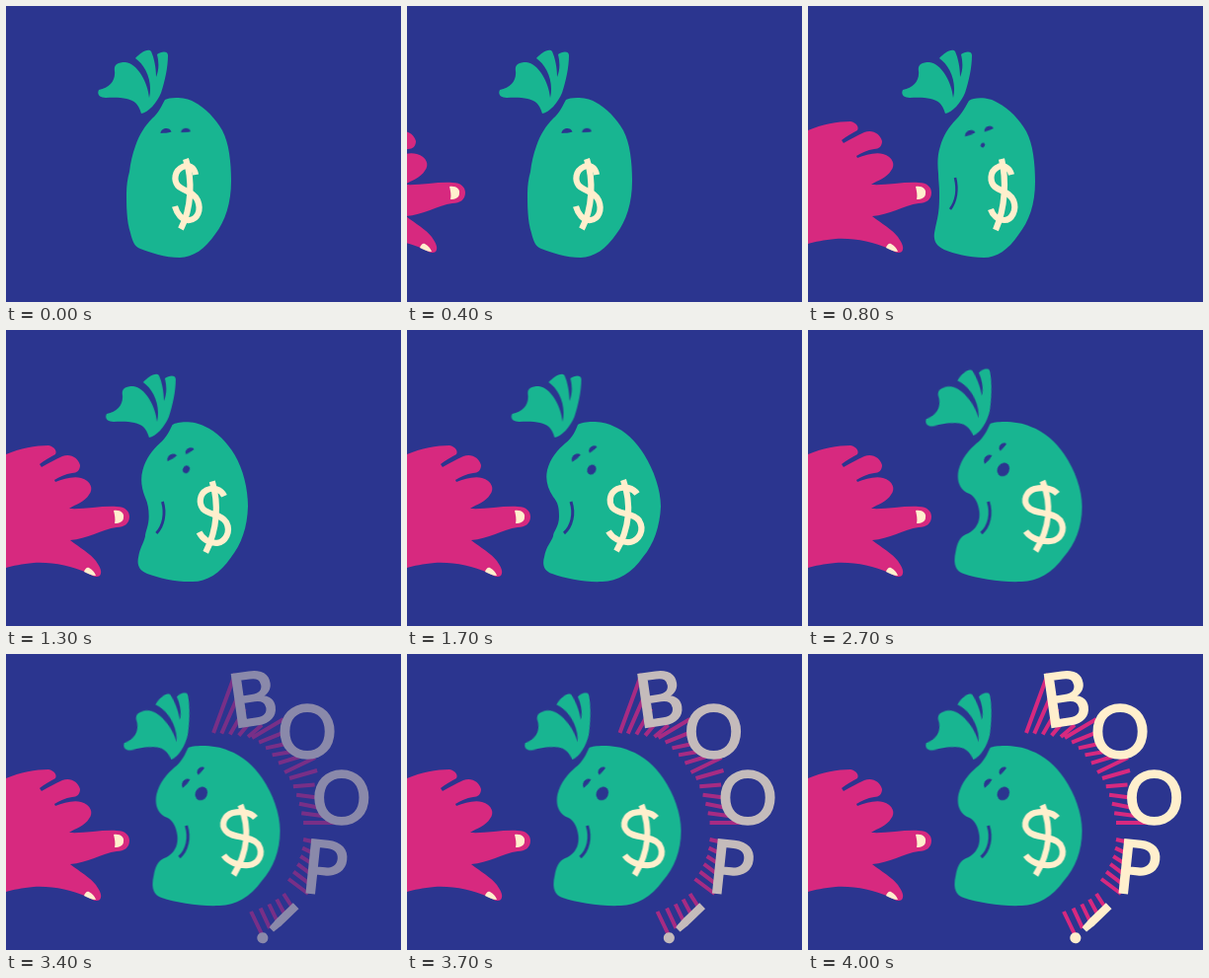
Write an HTML page that moves like this. It is 400 by 300 pixels and loops after 7000 ms.

```html
<!DOCTYPE html>
<html lang="en">
<head>
<meta charset="utf-8">
<title>Boop</title>
<style>
  html, body { margin: 0; width: 100%; height: 100%; overflow: hidden; background: #2b358f; }
  svg { display: block; width: 100%; height: 100%; }

  .bag { fill: #18b591; }
  .ink { fill: #2b358f; }
  .line { fill: none; stroke-linecap: butt; }
  .coin { stroke: #ffefcd; stroke-width: 6.2; }
  .dent { stroke: #2b358f; }
  .skin { fill: #d7297f; }
  .nail { fill: #ffefcd; }
  .rays { stroke: #d7297f; stroke-width: 4; }
  .letters {
    fill: #ffefcd; stroke: #ffefcd; stroke-width: 2.4;
    font: 74.5px Lato, sans-serif; text-anchor: middle;
  }
  .letters .mark { font-size: 69px; }

  /* Motion advances ten times a second; each segment sets its own step count. */
  .move { animation: 7s steps(4) infinite; }
  #shift { animation-name: shift; }
  #hand { animation-name: hand; }
  #tie { animation-name: tie; transform-origin: 137px 109px; }
  #body { animation-name: body; }
  #curve { animation-name: curve; }
  #bar { animation-name: bar; }
  #eyeL { animation-name: eyeL; }
  #eyeR { animation-name: eyeR; }
  #mouth { animation-name: mouth; }
  #dent { animation-name: dent; }
  #boop { animation-name: boop; }

  @keyframes hand {
    0% { transform: translateX(-132px); animation-timing-function: steps(8); }
    11.42%, 100% { transform: none; }
  }
  @keyframes shift {
    0%, 29.99% { transform: translateX(0); animation-timing-function: steps(6); }
    38.56%, 100% { transform: translateX(10.5px); }
  }
  @keyframes boop {
    0%, 41.42% { transform: translateX(-20px); opacity: 0; animation-timing-function: steps(11); }
    57.13%, 100% { transform: translateX(0); opacity: 1; }
  }
  @keyframes tie {
    0%, 5.71% { transform: translate(0, 0) rotate(0deg) scale(1); }
    11.42% { transform: translate(2px, 0) rotate(0deg) scale(1); animation-timing-function: steps(9); }
    24.28% { transform: translate(12.5px, 0) rotate(0deg) scale(1); }
    29.99%, 100% { transform: translate(20px, -2px) rotate(-10deg) scale(1.03); }
  }
  @keyframes body {
    0%, 5.71% { d: path("M161,95 C166,92 182,92 190,97 C202,103 212,114 219,126 C226,139 228,159 228,177 C228,200 222,218 212,231 C202,246 189,255 176,255 C161,255 146,250 136,246 C130,244 128,238 126,230 C124,224 123,217 122.5,210 C122,203 122,196 122,190 C122,182 123,175 125,168 C126,159 128,150 131,142 C135,130 141,121 148,114 C155,108 158,100 161,95Z"); }
    11.42% { d: path("M163,96 C168,92 184,92 192,98 C204,104 214,115 221,127 C228,140 230,160 230,178 C230,201 224,218 213,232 C203,247 191,255 178,255 C163,255 148,251 138,247 C129,243 127,237 128,230 C129,223 131,217 132,210 C133,203 133,196 133,189 C133,183 132,176 132,170 C131,160 131,151 134,142 C137,131 143,122 150,115 C156,109 160,101 163,96Z"); animation-timing-function: steps(9); }
    24.28% { d: path("M173,96 C179,92 198,92 208,97 C221,102 232,113 240,126 C250,142 257,162 257,179 C256,199 250,217 239,230 C228,246 213,255 198,255 C181,256 161,252 147,247 C138,244 137,237 139,230 C141,219 146,215 148,209 C148,204 154,200 154,189 C154,180 153,175 148,169 C142,160 140,151 142,142 C145,130 153,121 160,115 C168,109 171,101 173,96Z"); }
    29.99%, 100% { d: path("M174,95 C180,92 203,92 215,98 C229,103 240,113 249,126 C260,142 267,162 267,179 C267,200 260,217 248.5,230 C237,246 222,255 206,255 C186,256 162,252 147,247 C137,244 137,233 139,225 C141,213 145,208 152,206 C161,201 164,193 163,184 C162,176 159,169 153,166 C142,162 140,151 142,142 C145,130 153,121 160,115 C168,109 171,101 174,95Z"); }
  }
  @keyframes curve {
    0%, 5.71% { d: path("M192,171 C191,163 184,160 179,163 C170,167 170,177 174,182 C180,188 190,188 194,197 C198,207 194,216 186,217 C178,218 173,210 171,203"); }
    11.42% { d: path("M206,171 C204,163 197,160 191,164 C184,168 184,178 189,183 C195,188 204,188 208,197 C212,207 206,217 199,217 C192,217 187,212 185,206"); animation-timing-function: steps(9); }
    24.28% { d: path("M233,166 C229,160 220,158 213,161 C205,165 204,174 208,180 C215,188 228,184 235,193 C241,203 235,213 226,215 C217,216 208,211 204,204"); }
    29.99%, 100% { d: path("M242,166 C237,160 227,159 219,161 C210,164 207,173 212,179 C219,188 237,183 245,193 C251,203 245,213 235,214 C225,215 215,211 210,204"); }
  }
  @keyframes bar {
    0%, 5.71% { d: path("M182,155 C189,176 188,205 177,226"); }
    11.42% { d: path("M196,155 C201,176 200,204 190,227"); animation-timing-function: steps(9); }
    24.28% { d: path("M219,152 C227,175 226,200 212,224"); }
    29.99%, 100% { d: path("M227,153 C236,175 235,200 220,224"); }
  }
  @keyframes eyeL {
    0%, 5.71% { transform: translate(162px, 127px) rotate(0deg); }
    11.42% { transform: translate(164px, 129px) rotate(-15deg); animation-timing-function: steps(9); }
    24.28% { transform: translate(171px, 129px) rotate(-33deg); }
    29.99%, 100% { transform: translate(171.5px, 130.5px) rotate(-42deg); }
  }
  @keyframes eyeR {
    0%, 5.71% { transform: translate(182px, 126.5px) rotate(0deg) scale(.9); }
    11.42% { transform: translate(183px, 124.5px) rotate(-15deg) scale(.9); animation-timing-function: steps(9); }
    24.28% { transform: translate(188px, 120.5px) rotate(-33deg) scale(.9); }
    29.99%, 100% { transform: translate(186.5px, 118px) rotate(-42deg) scale(.9); }
  }
  @keyframes mouth {
    0%, 5.71% { transform: translate(173px, 141px) rotate(30deg) scale(0); }
    11.42% { transform: translate(177px, 141px) rotate(30deg) scale(.35); animation-timing-function: steps(9); }
    24.28% { transform: translate(187px, 141.5px) rotate(30deg) scale(.72); }
    29.99%, 100% { transform: translate(187.3px, 141.5px) rotate(30deg) scale(1); }
  }
  @keyframes dent {
    0%, 5.71% { d: path("M142,174 C144,186 143,198 138,206"); stroke-width: 0; }
    11.42% { d: path("M149,174 C152,186 150,198 144,206"); stroke-width: 2.6; animation-timing-function: steps(9); }
    24.28% { d: path("M166,174 C170,186 167,199 159,206"); stroke-width: 3; }
    29.99%, 100% { d: path("M172,174 C176,186 173,199 165,206"); stroke-width: 3; }
  }
</style>
</head>
<body>
<svg viewBox="0 0 400 300">
  <g id="shift" class="move">
    <path id="tie" class="bag move" d="M94,85 C92,89 94,93 101,93 C113,92 126,93 131,98 C135,102 136,106 137,109 C144,108 153,98 157,88 C161,76 164,62 164,50 C164,45 157,46 153,49 C155,57 155,65 152,72 C152,62 150,53 147,46 C144,42 135,48 131,53 C141,60 149,76 145,93 C144,78 133,58 121,57 C112,57 109,60 110,66 C111,76 105,83 94,85Z"/>
    <path id="body" class="bag move"/>
    <path id="eyeL" class="ink move" d="M-5.5,2 C-5,-4 4,-4.5 5.5,.5 C2,2 -2,1.5 -5.5,2Z"/>
    <path id="eyeR" class="ink move" d="M-5.5,2 C-5,-4 4,-4.5 5.5,.5 C2,2 -2,1.5 -5.5,2Z"/>
    <ellipse id="mouth" class="ink move" rx="6" ry="7.2"/>
    <path id="dent" class="line dent move"/>
    <path id="curve" class="line coin move"/>
    <path id="bar" class="line coin move"/>
  </g>

  <g id="hand" class="move">
    <path class="skin" d="M-20,134 L0,126 C14,120 30,117 43,117 C49,118 52,123 50,126 C44,129 38,133 34,136 L36,139 C43,135 50,131 57,128 C66,125 73,130 75,137 C75,142 72,145 67,145 C60,146 54,149 49,152 L50,154 C58,151 68,148 76,150 C86,153 89,161 84,167 C80,174 70,177 64,181 C79,182 97,178 112,179 C121,179 125,184 125,189 C125,196 120,200 112,200 C97,202 82,212 65,213 C74,220 86,227 91,234 C95,240 98,245 95,249 C91,252 86,248 82,246 C66,239 47,235 28,236 C16,237 7,239 0,241 L-20,245Z"/>
    <path class="nail" d="M109,183 C116,182 120,186 119,190 C119,194 115,196 110,196 C111,192 110,187 109,183Z M79,245 C80,242 82,240 84,241 C88,243 90,246 91,249 C87,249 83,247 79,245Z"/>
  </g>

  <g id="boop" class="move">
    <path class="rays"/>
    <g class="letters">
      <text transform="translate(260.8 45) rotate(-8)" y="26.7">B</text>
      <text transform="translate(316 78)" y="26.7">O</text>
      <text transform="translate(350.6 145)" y="26.7">O</text>
      <text transform="translate(334 216.5) rotate(6)" y="26.7">P</text>
      <text class="mark" transform="translate(286 273.3) rotate(46)" y="24.7">!</text>
    </g>
  </g>
</svg>
<script>
  // Each fan joins points on an inner curve to points on an outer curve.
  const fans = [
    { count: 5, inner: [221, 80, 237, 81, 256, 84], outer: [243, 20, 249, 65, 270, 72] },
    { count: 6, inner: [260, 85, 278, 95, 293, 120], outer: [292, 66, 282, 106, 324, 105] },
    { count: 6, inner: [298, 126, 308, 146, 312, 171], outer: [326, 118, 316, 157, 345, 171] },
    { count: 6, inner: [312, 188, 311, 210, 297, 228], outer: [321, 190, 320, 218, 317, 243] },
    { count: 5, inner: [259, 261, 279, 255, 292, 243], outer: [270, 284, 286, 272, 301, 257] }
  ];

  const pointOn = ([x0, y0, cx, cy, x1, y1], t) => {
    const mix = (a, c, b) => (1 - t) ** 2 * a + 2 * t * (1 - t) * c + t * t * b;
    return `${mix(x0, cx, x1)},${mix(y0, cy, y1)}`;
  };

  const fanPath = ({ count, inner, outer }) =>
    Array.from({ length: count }, (_, i) => i / (count - 1))
      .map(t => `M${pointOn(inner, t)}L${pointOn(outer, t)}`)
      .join("");

  document.querySelector(".rays").setAttribute("d", fans.map(fanPath).join(""));
</script>
</body>
</html>
```
